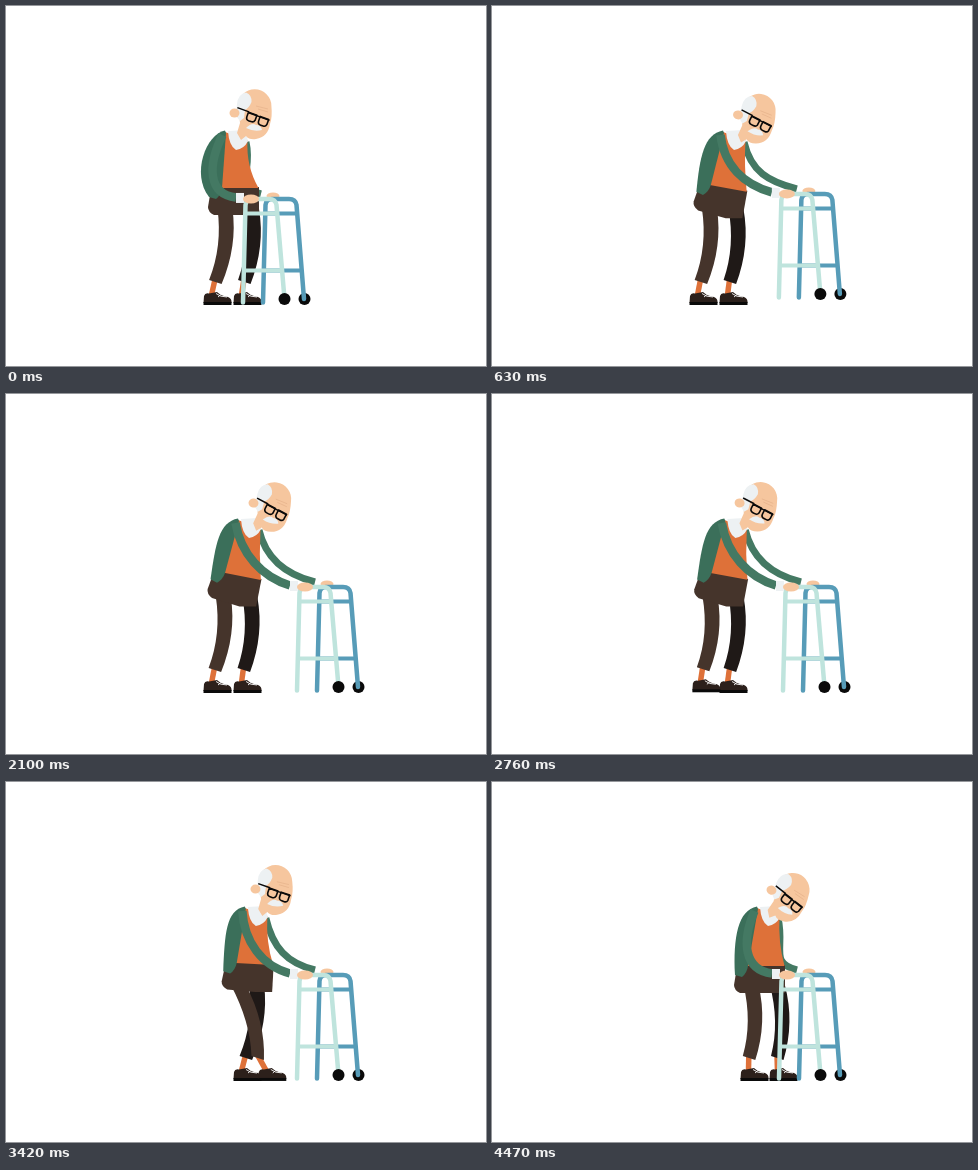
These frames come from a looping animation (480 by 360 pixels, 4.5 s). An HTML page with a canvas:

```html
<!DOCTYPE html>
<html lang="en">
<head>
<meta charset="utf-8">
<title>Walking with a frame</title>
<style>
html, body { margin: 0; width: 100%; height: 100%; overflow: hidden; background: #fff; }
canvas { display: block; }
</style>
</head>
<body>
<canvas id="stage" width="480" height="360"></canvas>
<script>
const ctx = document.getElementById('stage').getContext('2d');
const LOOP = 4500;
const SKIN = '#f6c69e', ORANGE = '#de7139', GREEN = '#3b6f5a', SLEEVE = '#447963',
  BROWN = '#45342b', DARK = '#1f1917', SHOE = '#2c201b', BLACK = '#0a0a0a', WHITE = '#edf1f3',
  PALE = '#bfe4dd', BLUE = '#579cb8';

// time, ear x, ear y, head tilt, chest x, hip x, hip y, hip tilt, back bulge
const POSES = [
  [0, 228, 107, 0, 219, 216, 182, 0, 1],
  [760, 247, 109, 8, 232, 219, 179, 11, 0],
  [2650, 247, 109, 8, 232, 219, 179, 11, 0],
  [3500, 249, 107, -1, 239, 231, 181, 3, 0.15],
  [4470, 283, 108, 18, 269, 260, 184, 0, 0.3]
];

const progress = (t, from, to) => Math.min(1, Math.max(0, (t - from) / (to - from)));
const smooth = p => p * p * (3 - 2 * p);
const hump = p => Math.sin(Math.PI * p);
const rad = deg => deg * Math.PI / 180;

function poseAt(t) {
  let i = 0;
  while (i < POSES.length - 2 && t >= POSES[i + 1][0]) i++;
  const a = POSES[i], b = POSES[i + 1], k = smooth(progress(t, a[0], b[0]));
  return a.map((v, n) => v + (b[n] - v) * k).slice(1);
}

function fill(d, color) {
  ctx.fillStyle = color;
  ctx.fill(new Path2D(d));
}

function line(d, color, width, cap = 'butt') {
  ctx.strokeStyle = color;
  ctx.lineWidth = width;
  ctx.lineCap = cap;
  ctx.lineJoin = 'round';
  ctx.stroke(new Path2D(d));
}

function oval(x, y, rx, ry, color) {
  ctx.fillStyle = color;
  ctx.beginPath();
  ctx.ellipse(x, y, rx, ry, 0, 0, 7);
  ctx.fill();
}

function at(x, y, deg, draw) {
  ctx.save();
  ctx.translate(x, y);
  ctx.rotate(rad(deg));
  draw();
  ctx.restore();
}

const wheel = (x, y) => oval(x + 41.5, y + 293, 6, 6, BLACK);

function frameSide(x, y, color, legEnd) {
  at(x, y, 0, () => {
    line('M2.5 207.5H35M1 264.5H39', color, 4);
    line(`M0 296.5L2.5 199Q3 193 9 193H26Q32.5 193 33.5 199L41 ${legEnd}`, color, 4.5, 'round');
  });
}

function leg(hipX, shoeX, lift, color) {
  const ankle = shoeX + 6.5 + (hipX - shoeX) * 0.3, y = 276 - lift;
  const knee = (hipX + ankle) / 2 + 9;
  line(`M${ankle - 1} ${y - 3}L${shoeX + 8.5} ${y + 13}`, ORANGE, 5.5);
  at(shoeX, -lift, 0, () => {
    fill('M.5 297L1 290Q2 286.5 6 287.5L14 286Q18 290 25 291Q29 292.5 28.5 297Z', SHOE);
    fill('M.5 296H28.5V299H.5Z', BLACK);
    line('M13 287.5Q17 291 24 291M15 291L18 288.5', '#fff', 0.9);
  });
  fill(`M${hipX - 7.5} 203Q${knee - 7} 240 ${ankle - 7} ${y - 2}L${ankle + 5.5} ${y + 2}
    Q${knee + 8} 240 ${hipX + 7.5} 203Z`, color);
}

function head(x, y, tilt) {
  at(x, y, tilt, () => {
    fill('M4 -7A16.7 16.7 0 0 1 37.4 -7Q38.5 4 36 11Q34 24 22 26Q15 27 12 23L7 27L3 20L6 10Z', SKIN);
    fill('M3 -9Q4 -19 12 -20.5Q18 -18 17.5 -11Q15 -5 11 -3L10 5L6 8L2 3Z', WHITE);
    oval(0.5, 0, 5, 4.5, SKIN);
    line('M22 -7L34 -4M24 -4L34 -1', '#e5b28b', 0.7);
    fill('M12 15Q18 9 22 12Q27 12 28 17Q20 19 12 15Z', WHITE);
    at(17.5, 4, 20, () => {
      line('M-16.5 -4H-4M-4 -3H18', BLACK, 1.5);
      line('M-4.5 -3.5H4.5V2Q4 4.5 1 4.5H-1Q-4.5 4.5 -4.5 1ZM8 -3.5H17V2Q16.5 4.5 14 4.5H11.5Q8 4.5 8 1Z', BLACK, 1.6);
    });
  });
}

function draw(t) {
  const [earX, earY, tilt, chest, hipX, hipY, lean, bulge] = poseAt(t);
  const push = progress(t, 0, 760);
  const wx = 237 + 54 * smooth(push), wy = -10 * hump(push);
  const nearStep = progress(t, 2650, 3450), farStep = progress(t, 3450, 4250);
  const nearShoe = 197 + 55 * smooth(nearStep), farShoe = 227 + 54 * smooth(farStep);
  const hip = (x, y) => {
    const c = Math.cos(rad(lean)), s = Math.sin(rad(lean));
    return [hipX + x * c - y * s, hipY + x * s + y * c];
  };

  ctx.fillStyle = '#fff';
  ctx.fillRect(0, 0, 480, 360);
  ctx.save();
  ctx.translate(-4 * progress(t, 4380, 4470) ** 2, 0);

  const nearHip = hip(3, 24)[0], farHip = nearHip + 22 + 0.15 * (farShoe - nearShoe);
  const farWrist = wx + 18, handY = 192 + wy;
  leg(farHip, farShoe, 4 * hump(farStep) ** 2, DARK);
  oval(wx + 30, handY - 2, 6.5, 3.5, SKIN);
  wheel(wx + 20, wy);
  frameSide(wx + 20, wy, BLUE, 293);
  leg(nearHip, nearShoe, 4 * hump(nearStep) ** 2, BROWN);

  line(`M${chest + 21} 136C${chest + 28} 166 ${farWrist - 28} ${handY - 11} ${farWrist} ${handY - 4}`, SLEEVE, 7);
  fill(`M${hip(0, -1)}L${hip(37, -1)}L${hip(37, 27)}H${hip(20, 27)[0]}L${hip(-8, 27)}
    Q${hip(-14, 24)} ${hip(-14, 19)}L${hip(-12, 7)}Z`, BROWN);
  fill(`M${chest} 126L${chest + 22.5} 134Q${chest + 21} 160 ${hip(36.5, 0)}L${hip(-1, 0)}Z`, ORANGE);

  const [backX, backY] = hip(-13, 9);
  fill(`M${chest} 124.5C${chest - 19} 128 ${backX + 5 - 23 * bulge} ${150 + 18 * bulge} ${backX} ${backY}
    L${hip(-6, 11)}Q${hip(-1, 7)} ${hip(0, 0)}L${chest + 1} 127Z`, GREEN);
  fill(`M${chest + 3} 125Q${chest + 4} 140 ${chest + 11} 144Q${chest + 19} 143 ${chest + 23} 135L${chest + 20} 124Z`, WHITE);

  const wrist = wx - 7, shoulder = chest - 2.5, reach = wrist - shoulder;
  const elbow = shoulder + (reach - 44) * 0.5;
  line(`M${shoulder} 129C${elbow} 160 ${wrist - 28} ${handY - 2 - reach * 0.13} ${wrist} ${handY - 0.5}`, SLEEVE, 8.5);
  head(earX, earY, tilt);

  frameSide(wx, wy, PALE, 287);
  wheel(wx, wy);
  line(`M${wrist} ${handY}H${wx + 1}`, WHITE, 10);
  oval(wx + 8, handY + 1, 8, 4.5, SKIN);
  ctx.restore();
}

function tick() {
  draw(performance.now() % LOOP);
  requestAnimationFrame(tick);
}
tick();
</script>
</body>
</html>
```
